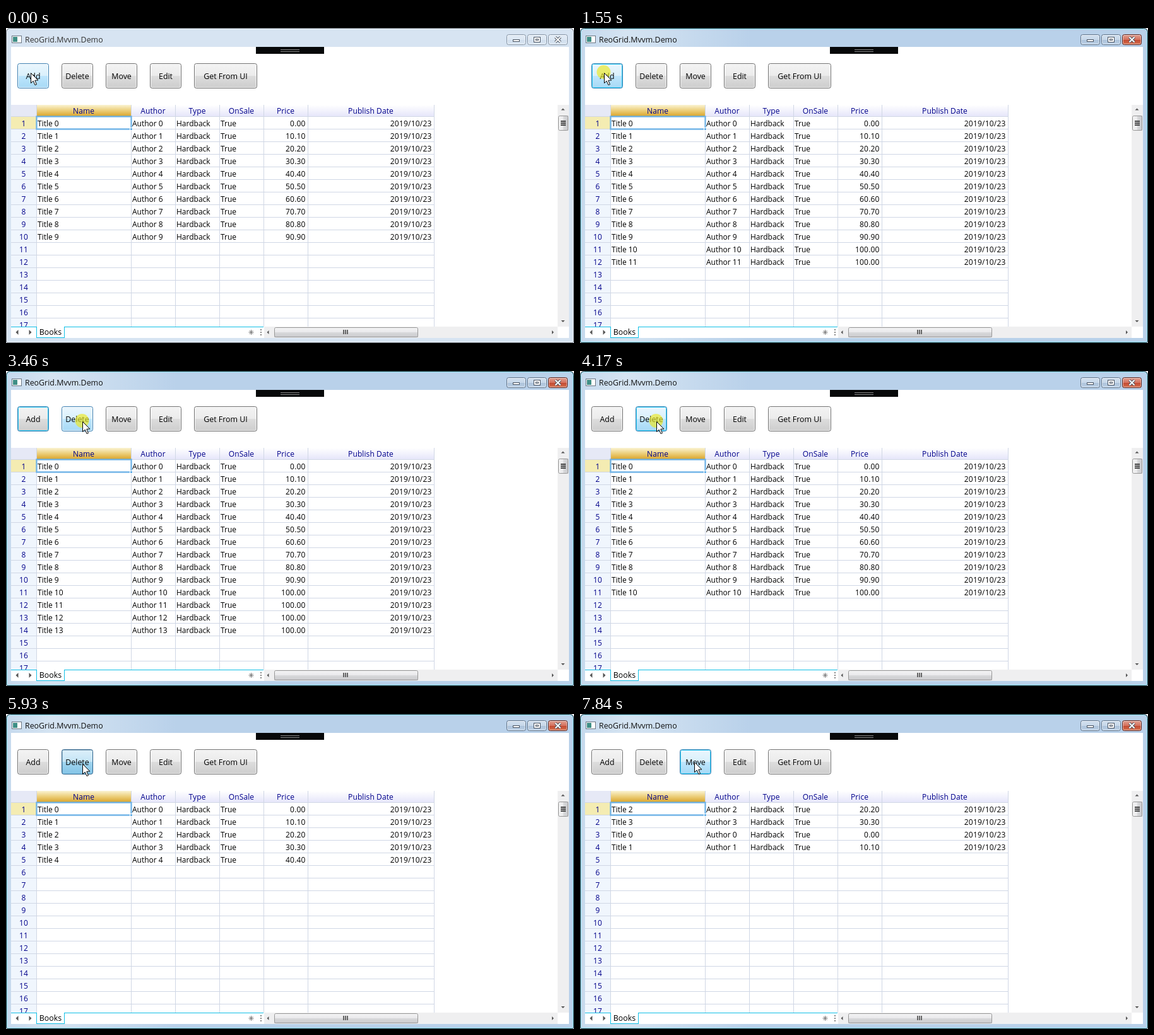
An HTML page with a canvas that plays this animation: 900x500 px, repeating every 8000 ms.

```html
<!DOCTYPE html>
<html lang="en">
<head>
<meta charset="utf-8">
<title>Grid demo</title>
<style>
html, body { margin: 0; width: 100%; height: 100%; overflow: hidden; background: #fff; }
canvas { display: block; }
</style>
</head>
<body>
<canvas id="stage" width="900" height="500"></canvas>
<script>
const g = document.getElementById('stage').getContext('2d');
const LOOP = 8000, PRESS = 80, LIFT = 160, DONE = 240;
const FONT = '"Open Sans", "Noto Sans", sans-serif';
const GRID = '#d0d7e5', NAVY = '#00008b', CYAN = '#10bfe6';

const buttons = [['Add', 18, 50], ['Delete', 88, 50], ['Move', 158, 50], ['Edit', 228, 50], ['Get From UI', 298, 100]];
const columns = [['Name', 48, 198], ['Author', 198, 268], ['Type', 268, 338], ['OnSale', 338, 408], ['Price', 408, 478], ['Publish Date', 478, 678]];

// Mouse-down times for each button
const clicks = [
  [370, 1000, 1550, 2030],
  [3460, 3700, 3940, 4170, 4410, 4650, 4890, 5050, 5290, 5770],
  [7050, 7520]
].flatMap((times, button) => times.map(at => ({ at, button })));

// Cursor tip: time, x, y
const path = [[0, 39, 71], [2030, 38, 71], [2270, 38, 71], [2830, 121, 80], [4330, 121, 80], [4410, 121, 79],
  [6010, 121, 79], [6570, 178, 76], [7050, 178, 76], [7130, 181, 76], [LOOP, 181, 76]];

const looks = {
  normal: ['#f3f3f3', '#ebebeb', '#dddddd', '#cdcdcd', '#707070'],
  hover: ['#eaf6fd', '#d9f0fc', '#bee6fd', '#a7d9f5', '#3c7fb1'],
  pressed: ['#dceffa', '#c4e5f6', '#a2d6f0', '#84c4e6', '#2c628b']
};

function box(x, y, w, h, fill) {
  g.fillStyle = fill;
  g.fillRect(x, y, w, h);
}

function frame(x, y, w, h, r, stroke, width = 1) {
  g.beginPath();
  g.roundRect(x, y, w, h, r);
  g.strokeStyle = stroke;
  g.lineWidth = width;
  g.stroke();
}

function gradient(x0, y0, x1, y1, stops) {
  const fill = g.createLinearGradient(x0, y0, x1, y1);
  stops.forEach(([at, color]) => fill.addColorStop(at, color));
  return fill;
}

// Two-part glossy shading with a break in the middle
const gloss = (x0, y0, x1, y1, [a, b, c, d]) => gradient(x0, y0, x1, y1, [[0, a], [.5, b], [.5, c], [1, d]]);

function text(s, x, y, { align = 'left', color = '#000', size = 12, gap = 0 } = {}) {
  g.font = `${size}px ${FONT}`;
  g.textAlign = align;
  g.letterSpacing = gap + 'px';
  g.fillStyle = color;
  g.fillText(s, x, y);
}

function poly(points, fill) {
  g.beginPath();
  points.forEach(([x, y]) => g.lineTo(x, y));
  g.closePath();
  g.fillStyle = fill;
  g.fill();
}

// Triangle pointing along (dx, dy)
function arrow(x, y, dx, dy, r, fill) {
  poly([[x + dx * r, y + dy * r], [x - dy * r, y + dx * r], [x + dy * r, y - dx * r]], fill);
}

function stateAt(t) {
  const ids = Array.from({ length: 10 }, (_, i) => i);
  const state = { ids, focus: -1, down: -1, glow: false, active: t >= 370 + PRESS };
  clicks.forEach(({ at, button }, i) => {
    if (t < at) return;
    const next = clicks[i + 1];
    const done = Math.min(at + DONE, next ? next.at : LOOP);
    if (t >= at + PRESS) state.focus = button;
    if (t >= done) {
      if (button === 0) ids.push(ids.length);
      if (button === 1) ids.pop();
      if (button === 2) ids.push(ids.shift());
    } else {
      state.glow = t < at + LIFT;
      if (t >= at + PRESS) state.down = button;
    }
  });
  return state;
}

function cursorAt(t) {
  const i = path.findIndex(p => p[0] > t);
  const [t0, x0, y0] = path[i - 1], [t1, x1, y1] = path[i];
  const p = Math.floor((t - t0) / 80) * 80 / (t1 - t0);
  const k = p * p * (3 - 2 * p);
  return [Math.round(x0 + (x1 - x0) * k), Math.round(y0 + (y1 - y0) * k)];
}

function drawWindow(active) {
  box(0, 0, 900, 500, '#fff');
  g.beginPath();
  g.roundRect(0, 0, 900, 500, [6, 6, 2, 2]);
  g.fillStyle = active
    ? gradient(0, 0, 900, 0, [[0, '#c5d9ed'], [.08, '#d5e4f2'], [.3, '#b9d1ea'], [1, '#b9d1ea']])
    : '#d7e4f2';
  g.fill();
  frame(1.5, 1.5, 897, 497, [5, 5, 1, 1], active ? '#8be4f5' : '#eff5fb');
  frame(.5, .5, 899, 499, [6, 6, 2, 2], active ? '#22282e' : '#5c646c');
  box(8, 30, 884, 462, '#fff');

  box(9, 12, 16, 12, '#6c7884');
  box(10, 13, 14, 10, '#fff');
  box(11, 14, 7, 8, '#3f8f86');
  text('ReoGrid.Mvvm.Demo', 30, 23, { size: 12.4, color: active ? '#111' : '#333' });

  const plain = active ? ['#d5e2f0', '#c6d7e9', '#abc1d9', '#bfd3e8'] : ['#e3ecf6', '#dce7f3', '#d0deed', '#dae6f2'];
  const red = ['#e3a597', '#d4705c', '#c1442c', '#d97a58'];
  [793, 826, 859].forEach((x, i) => {
    const close = active && i === 2;
    g.beginPath();
    g.roundRect(x + .5, 10.5, 30, 16, 3);
    g.fillStyle = gloss(0, 10, 0, 27, close ? red : plain);
    g.fill();
    frame(x + 1.5, 11.5, 28, 14, 2, 'rgba(255,255,255,.5)');
    frame(x + .5, 10.5, 30, 16, 3, close ? '#5c2018' : active ? '#5f7389' : '#8594a5');
  });
  const ink = '#4b5563';
  box(803, 18, 11, 4, ink);
  box(804, 19, 9, 2, '#fff');
  box(836, 14, 11, 9, ink);
  box(837, 15, 9, 7, '#fff');
  box(839, 17, 5, 3, ink);
  box(840, 18, 3, 1, '#fff');
  [[4, ink], [2, '#fff']].forEach(([width, color]) => {
    g.beginPath();
    g.moveTo(870.5, 14.5); g.lineTo(878.5, 22.5);
    g.moveTo(878.5, 14.5); g.lineTo(870.5, 22.5);
    g.lineWidth = width;
    g.strokeStyle = color;
    g.stroke();
  });

  box(396, 30, 108, 11, '#070809');
  box(435, 34, 30, 1, '#8a8a8a');
  box(435, 37, 30, 1, '#8a8a8a');
}

function drawButton([label, x, w], look, focused) {
  const c = looks[look];
  g.beginPath();
  g.roundRect(x + .5, 56.5, w - 1, 39, 3);
  g.fillStyle = gloss(0, 57, 0, 95, c);
  g.fill();
  if (look === 'pressed') {
    box(x + 1, 57, w - 2, 1, 'rgba(40,80,110,.35)');
    box(x + 1, 57, 1, 38, 'rgba(40,80,110,.25)');
  } else {
    frame(x + 1.5, 57.5, w - 3, 37, 2, focused ? '#30cdf5' : 'rgba(255,255,255,.8)');
  }
  frame(x + .5, 56.5, w - 1, 39, 3, focused && look === 'normal' ? looks.hover[4] : c[4]);
  text(label, x + w / 2, 81, { align: 'center', size: 12.4 });
}

function drawGrid(ids) {
  g.save();
  g.beginPath();
  g.rect(8, 122, 866, 352);
  g.clip();
  box(8, 122, 40, 19, '#e6e9f6');
  box(8, 141, 40, 333, '#f0f6fd');
  columns.forEach(([label, x0, x1], i) => {
    box(x0, 122, x1 - x0, 18, i
      ? gradient(0, 122, 0, 140, [[0, '#fff'], [1, '#e6e6fa']])
      : gradient(0, 122, 0, 140, [[0, '#faf3d2'], [.5, '#ecce79'], [1, '#daa52c']]));
    text(label, (x0 + x1) / 2, 136, { align: 'center', color: NAVY, gap: .1 });
  });
  box(8, 141, 40, 19, '#f4ecb2');
  for (let r = 0; r < 17; r++) {
    const y = 140 + r * 20;
    box(8, y, 670, 1, GRID);
    text(r + 1, 28, y + 16, { align: 'center', color: NAVY, gap: .1 });
    if (r >= ids.length) continue;
    const id = ids[r];
    text('Title ' + id, 50, y + 16);
    text('Author ' + id, 200, y + 16);
    text('Hardback', 270, y + 16);
    text('True', 340, y + 16);
    text(Math.min(id * 10.1, 100).toFixed(2), 474.5, y + 16, { align: 'right', gap: .15 });
    text('2019/10/23', 674.5, y + 16, { align: 'right', gap: .2 });
  }
  columns.forEach(([, x0, x1]) => {
    box(x0, 122, 1, 352, GRID);
    box(x1, 122, 1, 352, GRID);
  });
  frame(48.5, 140.5, 150, 20, 0, 'rgba(96,172,230,.85)', 2.4);
  box(196, 158, 5, 5, '#fff');
  box(197, 159, 3, 3, '#69b1e6');
  g.restore();
}

function drawBars() {
  box(8, 474, 400, 1, CYAN);
  box(48, 474, 45, 18, CYAN);
  box(49, 474, 43, 17, '#fff');
  text('Books', 70.5, 487, { align: 'center', size: 12.4 });
  arrow(19.5, 483, -1, 0, 4, '#555');
  arrow(36.5, 483, 1, 0, 4, '#555');
  g.beginPath();
  for (let i = 0; i < 4; i++) {
    const a = i * Math.PI / 4, dx = 4 * Math.cos(a), dy = 4 * Math.sin(a);
    g.moveTo(388.5 - dx, 483 - dy);
    g.lineTo(388.5 + dx, 483 + dy);
  }
  g.strokeStyle = '#777';
  g.lineWidth = 1;
  g.stroke();
  [478, 482, 486].forEach(y => box(403, y, 2, 2, '#888'));

  box(874, 122, 18, 352, '#efeff0');
  box(409, 474, 465, 18, '#efeff0');
  arrow(882.5, 130.5, 0, -1, 3, '#555');
  arrow(882.5, 464, 0, 1, 3, '#555');
  arrow(416.5, 483, -1, 0, 3, '#555');
  arrow(865, 483, 1, 0, 3, '#555');

  const thumb = ['#f5f5f5', '#e9e9eb', '#d9dadc', '#c9c9cc'];
  box(875, 139, 16, 24, gloss(875, 0, 891, 0, thumb));
  frame(875.5, 139.5, 15, 23, 2, '#979797');
  box(425, 475, 228, 16, gloss(0, 475, 0, 491, thumb));
  frame(425.5, 475.5, 227, 15, 2, '#979797');
  for (let i = 0; i < 3; i++) {
    box(879, 147 + i * 3, 8, 2, '#444');
    box(534 + i * 3, 479, 2, 7, '#666');
  }
}

function drawCursor([x, y], glow) {
  if (glow) {
    g.beginPath();
    g.arc(x - .5, y - 1, 11, 0, 7);
    g.fillStyle = 'rgba(236,232,30,.65)';
    g.fill();
  }
  g.save();
  g.translate(x + .5, y + .5);
  poly([[0, 0], [0, 16], [3.7, 12.6], [6.5, 19], [9, 18], [6.3, 11.7], [11.4, 11.5]], '#fff');
  g.strokeStyle = '#000';
  g.lineWidth = 1;
  g.stroke();
  g.restore();
}

function draw(t) {
  const state = stateAt(t), tip = cursorAt(t);
  drawWindow(state.active);
  buttons.forEach((button, i) => {
    const over = tip[0] >= button[1] && tip[0] < button[1] + button[2];
    drawButton(button, state.down === i ? 'pressed' : over ? 'hover' : 'normal', state.focus === i);
  });
  drawGrid(state.ids);
  drawBars();
  drawCursor(tip, state.glow);
}

function tick() {
  draw(performance.now() % LOOP);
  requestAnimationFrame(tick);
}
tick();
</script>
</body>
</html>
```
